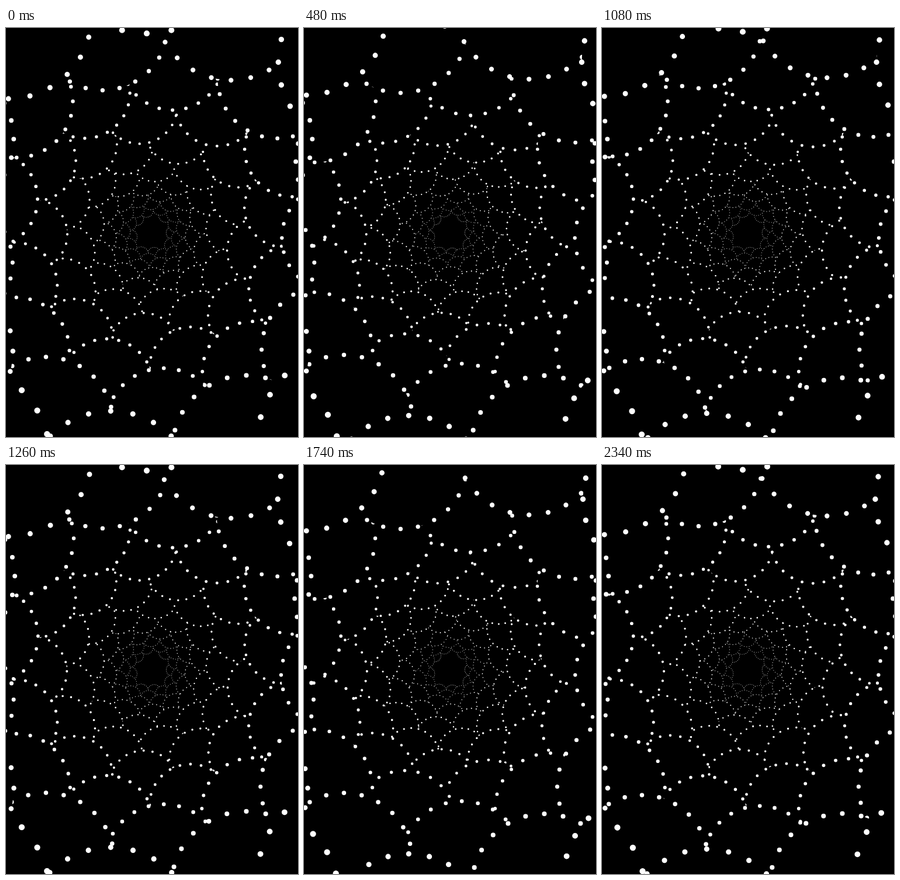
Write an HTML page with a canvas that moves like this. It is 500 by 700 pixels and loops after 2.4 s.

```html
<!DOCTYPE html>
<html lang="en">
<head>
<meta charset="utf-8">
<title>Breathing spiral</title>
<style>
  html, body { margin: 0; width: 100%; height: 100%; overflow: hidden; background: #000; }
  canvas { display: block; width: 500px; height: 700px; }
</style>
</head>
<body>
<canvas id="stage" width="500" height="700"></canvas>
<script>
const ctx = document.getElementById('stage').getContext('2d');
const TAU = Math.PI * 2;

const PERIOD = 1200;      // one breath, ms
const STEP = 60;          // time between pictures, ms
const CX = 250.5, CY = 350.5;
const COUNT = 112;
const TURN = 137.51 * Math.PI / 180;
const GROWTH = 1.025;
const SWELL = 0.054;
const LAG = 20.6;         // each disc peaks this much before the next inner one
const DOTS = 24;

// Discs on a logarithmic golden-angle spiral, inner ones first.
const discs = Array.from({ length: COUNT }, (_, n) => {
  const dist = 35.05 * Math.pow(GROWTH, n);
  return {
    x: CX + dist * Math.cos(n * TURN),
    y: CY - dist * Math.sin(n * TURN),
    radius: dist * 0.3075,
    dot: Math.max(0.5, dist * 0.01),
    peak: 1074 - LAG * n
  };
});

function circle(x, y, r) {
  ctx.moveTo(x + r, y);
  ctx.arc(x, y, r, 0, TAU);
}

function drawDisc(disc, time) {
  const r = disc.radius * (1 + SWELL * Math.cos(TAU * (time - disc.peak) / PERIOD));

  ctx.fillStyle = '#000';
  ctx.beginPath();
  circle(disc.x, disc.y, r);
  ctx.fill();

  ctx.fillStyle = '#fff';
  ctx.beginPath();
  for (let i = 0; i < DOTS; i++) {
    const a = i * TAU / DOTS;
    circle(disc.x + r * Math.cos(a), disc.y + r * Math.sin(a), disc.dot);
  }
  ctx.fill();
}

function draw(time) {
  ctx.fillStyle = '#000';
  ctx.fillRect(0, 0, 500, 700);
  for (const disc of discs) drawDisc(disc, time);
}

let shown = -1;
function tick() {
  const step = Math.floor(performance.now() / STEP + 0.02);
  if (step !== shown) {
    shown = step;
    draw(step * STEP % PERIOD);
  }
  requestAnimationFrame(tick);
}
tick();
</script>
</body>
</html>
```
